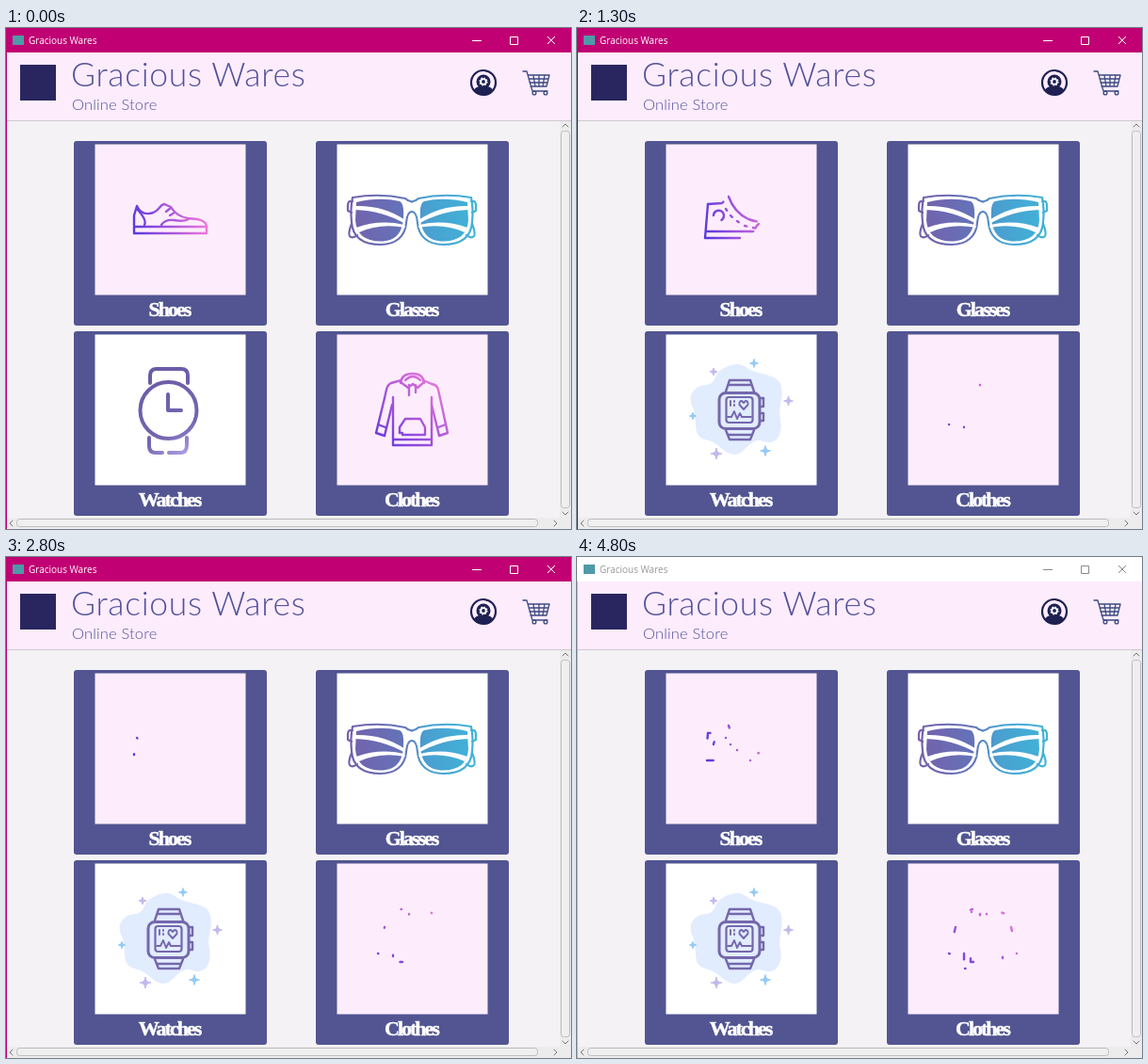
An HTML page for the animation above (4900 ms loop, 600x532 px).

```html
<!DOCTYPE html>
<html lang="en">
<head>
<meta charset="utf-8">
<title>Gracious Wares</title>
<style>
html, body { margin: 0; width: 100%; height: 100%; overflow: hidden; }
svg { display: block; width: 100%; height: 100%; }
.line { fill: none; stroke-linecap: round; stroke-linejoin: round; }
.label { font: bold 22px "Liberation Serif", serif; letter-spacing: -2px; fill: #fff; stroke: #fff; stroke-width: .5; text-anchor: middle; }
.name { font: 300 35.5px Lato, sans-serif; letter-spacing: .7px; }
.sub { font: 300 16.5px Lato, sans-serif; letter-spacing: .15px; }
.caption { font: 10px "Open Sans", sans-serif; }
.bar, .edge { fill: #c00073; }
.caption { fill: #fff; }
.buttons { stroke: #fff; }
.idle .bar { fill: #fff; }
.idle .edge { fill: #c6c4c8; }
.idle .caption { fill: #999; }
.idle .buttons { stroke: #8a8a8a; }
</style>
</head>
<body>
<svg id="stage" viewBox="0 0 600 532">
  <defs>
    <linearGradient id="shoeInk" gradientUnits="userSpaceOnUse" x1="136" y1="212" x2="212" y2="196">
      <stop offset="0" stop-color="#5a3bdc"/><stop offset=".5" stop-color="#a856dc"/><stop offset="1" stop-color="#f27ad8"/>
    </linearGradient>
    <linearGradient id="hoodInk" gradientUnits="userSpaceOnUse" x1="398" y1="438" x2="458" y2="374">
      <stop offset="0" stop-color="#6a3be0"/><stop offset=".5" stop-color="#ab56da"/><stop offset="1" stop-color="#e878d8"/>
    </linearGradient>
    <linearGradient id="lensInk" gradientUnits="userSpaceOnUse" x1="363" y1="0" x2="500" y2="0">
      <stop offset="0" stop-color="#7460ac"/><stop offset=".42" stop-color="#6473b8"/><stop offset=".6" stop-color="#4a9fd0"/><stop offset="1" stop-color="#40b4d8"/>
    </linearGradient>
    <linearGradient id="watchInk" gradientUnits="userSpaceOnUse" x1="150" y1="370" x2="196" y2="452">
      <stop offset="0" stop-color="#6a5ba6"/><stop offset=".7" stop-color="#7566b0"/><stop offset="1" stop-color="#b4a2e8"/>
    </linearGradient>
    <linearGradient id="glass" x1="0" y1="0" x2="1" y2="1">
      <stop offset="0" stop-color="#dceaf8"/><stop offset=".35" stop-color="#fff"/><stop offset="1" stop-color="#e4eefa"/>
    </linearGradient>
    <g id="half">
      <g class="line" stroke="#fff" stroke-width="2.2">
        <path d="M431 184.500Q427 184 424 181Q397 175 368 180C366 190 366 197 367 206C368 222 379 230 398 230C414 230 424 221 425 207Q426 195 431 195"/>
        <path d="M368 184H365Q363 185 363 189V194L367 196M367 208Q363 218 365 221Q368 224 373 220"/>
      </g>
      <path fill="#fff" d="M372 185Q397 179 418 184Q423 186 422 202C421 218 413 226.500 398 226.500C381 226.500 372 219 371 204Z"/>
      <path d="M370 189Q401 188 424 204V208Q400 194 370 193ZM372 212Q397 203 423 209L424 212Q397 207 375 217Z"/>
    </g>
    <mask id="frameMask" maskUnits="userSpaceOnUse" x="355" y="170" width="153" height="66">
      <use href="#half"/><use href="#half" transform="matrix(-1 0 0 1 862 0)"/>
    </mask>
    <g id="pinkHalf">
      <path d="M366 185Q395 180 421 184Q427 188 432 188V197Q426 197 423 207Q420 227 404 228Q382 230 374 220Q368 211 368 200L362 197V187Z" fill="#df8abc" stroke="#553459" stroke-width="1.4"/>
      <path d="M369 199Q371 226 404 227Q418 226 421 212Q412 224 392 221Q376 217 374 198Z" fill="#754078"/>
      <path d="M376 192Q398 187 417 191Q421 194 419 204Q415 221 402 221Q379 220 376 207Q373 197 376 192Z" fill="url(#glass)" stroke="#553459" stroke-width="1.3"/>
      <circle cx="367" cy="193" r="2.6" fill="#d98a4a" stroke="#553459"/>
    </g>
  </defs>

  <rect width="600" height="532" fill="#f4f2f5"/>
  <rect class="bar" width="600" height="26"/>
  <rect x="7" y="8" width="12" height="10" fill="#4f9aa8"/>
  <text class="caption" x="24" y="17">Gracious Wares</text>
  <path class="buttons" fill="none" d="M495 13.5H505M535.5 9.5H543.5V17.5H535.5ZM575 9L583 17M583 9L575 17"/>

  <rect y="26" width="600" height="72" fill="#fdecfc"/>
  <rect y="98" width="600" height="1" fill="#cfc8d0"/>
  <rect x="15" y="39" width="38" height="38" fill="#29265f"/>
  <g fill="#525299">
    <text class="name" x="69" y="62">Gracious Wares</text>
    <text class="sub" x="70" y="87">Online Store</text>
  </g>
  <circle cx="507" cy="58" r="13" fill="none" stroke="#1f2153" stroke-width="2.2"/>
  <path d="M497 66Q499 62 504 62H510Q515 62 517 66Q513 71 507 71Q501 71 497 66Z" fill="#1f2153"/>
  <circle cx="507" cy="57" r="7.5" fill="#1f2153"/>
  <circle cx="507" cy="57" r="2.8" fill="none" stroke="#fff" stroke-width="1.8"/>
  <circle cx="507" cy="57" r="4" fill="none" stroke="#fff" stroke-width="1.2" stroke-dasharray="1.6 1.54"/>
  <g class="line" stroke="#3c4a80" stroke-width="1.3">
    <path d="M549 46H553L559 67H575M554 50H577L574 62H557M555 54H576M556 58H575M560 50L562 62M566 50V62M572 50L570 62"/>
    <circle cx="561" cy="69" r="1.9"/><circle cx="573" cy="69" r="1.9"/>
  </g>

  <g id="cards"></g>

  <g id="blueGlasses"><rect x="355" y="170" width="153" height="66" fill="url(#lensInk)" mask="url(#frameMask)"/></g>
  <g id="pinkGlasses">
    <path fill="#fadde8" d="M385 138C400 130 420 138 435 132C455 127 462 143 485 142C510 144 508 172 490 176C478 182 500 183 508 200C514 220 500 237 470 236C478 243 485 250 480 257C470 272 430 262 410 270C395 274 384 265 388 255C393 245 385 242 370 240C352 235 350 210 365 203C385 195 395 185 380 177C362 170 364 143 385 138Z"/>
    <use href="#pinkHalf"/><use href="#pinkHalf" transform="matrix(-1 0 0 1 863 0)"/>
    <path class="line" stroke="#5b6077" stroke-width="1.2" d="M384 210L399 196M390 212L407 202M464 210L481 194M472 212L485 200"/>
  </g>

  <g id="roundWatch" class="line" stroke="url(#watchInk)" stroke-width="4">
    <circle cx="172.5" cy="406" r="30"/>
    <path d="M172 389V406H186M153 377V369Q153 362 160 362H186Q193 362 193 369V377M152 435V444Q152 451 159 451H166M173 451H185Q192 451 192 443V435"/>
  </g>
  <g id="smartWatch">
    <path id="wideBlob" fill="#e2ecff" d="M152 364C162 356 174 354 182 362C194 369 215 367 217 381C220 394 213 402 216 416C219 432 211 444 198 439C184 434 179 452 168 453C154 452 152 440 136 437C121 433 129 416 123 403C116 389 126 379 138 379C148 377 145 369 152 364Z"/>
    <path id="slimBlob" fill="#e2ecff" d="M154 363C165 354 176 355 184 364C194 371 211 369 215 382C219 394 216 406 218 418C217 431 210 438 198 437C185 438 180 451 169 452C154 452 151 440 138 436C127 431 134 416 129 405C123 391 128 381 140 379C149 376 147 368 154 363Z"/>
    <g id="stars"></g>
    <g class="line" stroke="#7468ac" stroke-width="3">
      <rect x="151" y="387.5" width="43" height="38" rx="7"/>
      <rect x="158.5" y="392" width="28" height="27" rx="3" stroke-width="2.2"/>
      <path stroke-width="2.4" d="M158 386L162 374H184L188 386M161 379H185M158 427L162 437H184L188 427M161 432H185M195 393H198V402H195M195 409H198V417H195"/>
      <path stroke-width="1.9" d="M160 413H164L167 407L170 415L173 409L175 413H185M163 396V401M167 396V397M167 400V401M177 405L172.500 400Q172 396 175 396L177 398L179 396Q182 396 181.500 400Z"/>
    </g>
  </g>
  <g id="lowShoe" class="line" stroke="url(#shoeInk)" stroke-width="2.4"></g>
  <g id="highShoe" class="line" stroke="url(#shoeInk)" stroke-width="2.4"></g>
  <g id="hoodie" class="line" stroke="url(#hoodInk)" stroke-width="2.4"></g>

  <g fill="#ececec">
    <rect x="588" y="99" width="12" height="433"/><rect y="520" width="600" height="12"/>
  </g>
  <g fill="#f0eff0" stroke="#bdbdbd">
    <rect x="589.5" y="109.5" width="9" height="400" rx="3"/><rect x="11.5" y="521.5" width="553" height="8" rx="3"/>
  </g>
  <path class="line" stroke="#777" d="M591 105L594 102L597 105M591 514L594 517L597 514M7 523L4 526L7 529M582 523L585 526L582 529"/>
  <rect class="edge" y="26" width="1" height="506"/>
</svg>
<script>
const LOOP = 4900;
const $ = id => document.getElementById(id);
const clamp = x => Math.min(1, Math.max(0, x));
const mod = (a, n) => ((a % n) + n) % n;

function add(parent, tag, attrs, text = "") {
  const el = document.createElementNS("http://www.w3.org/2000/svg", tag);
  for (const k in attrs) el.setAttribute(k, attrs[k]);
  el.textContent = text;
  parent.appendChild(el);
  return el;
}

function card(x, y, label, fill) {
  add($("cards"), "rect", { x, y, width: 205, height: 196, rx: 3, fill: "#525592" });
  add($("cards"), "rect", { x: x + 22.5, y: y + 3.5, width: 160, height: 160, fill });
  add($("cards"), "text", { x: x + 101.5, y: y + 186, class: "label" }, label);
}
const pink = "#fdedfc";
card(72, 120, "Shoes", pink);
card(329, 120, "Glasses", "#fff");
card(72, 322, "Watches", "#fff");
card(329, 322, "Clothes", pink);

function star(x, y, r, fill) {
  const d = `M${x} ${y - r}Q${x} ${y} ${x + r} ${y}Q${x} ${y} ${x} ${y + r}Q${x} ${y} ${x - r} ${y}Q${x} ${y} ${x} ${y - r}Z`;
  add($("stars"), "path", { d, fill, stroke: fill, "stroke-width": 1.6, "stroke-linejoin": "round" });
}
const lilac = "#c3b8ee", sky = "#94cbf6";
star(145, 365, 3.5, lilac); star(188, 356, 4, sky); star(224.5, 396, 4.5, lilac);
star(123, 412, 3.2, sky); star(148, 452, 5.5, lilac); star(200, 449, 5, sky);

// Strokes are listed in the order they begin to draw.
const strokes = (id, list) =>
  list.split("|").map(d => add($(id), "path", { d, pathLength: 1 }));

const low = strokes("lowShoe",
  "M139 192Q150 204 147 209|M136 210V199L139 189Q143 198 152 197C163 196 162 188 168 187|" +
  "M213 211H136|M136 212V218H213V211|M168 187L175 190Q181 200 193 202L203 203Q213 205 213 211|" +
  "M165 209Q169 203 178 204Q188 206 194 203|M170 195L175 191|M174 199L179 196");

const high = strokes("highShoe",
  "M139 187L154 186L161 179|M138 216H211|M145 199A5.500 5.500 0 1 1 145 199.500|" +
  "M193 208Q188 212 190 215|M184 216H185|" +
  "M139 187L136 223H200Q210 222 212 214|M161 179Q167 196 182 203Q194 207 204 207Q212 209 212 215|" +
  "M158 192L160 195|M163 199L166 202|M170 205L173 207|M178 210L182 211|M187 212L191 213");

const hood = strokes("hoodie",
  "M428 379V390|M395 421L403 424|M411 424V392|M421 430H418V424L424 415H440L445 424V432H421|M452 378L443 374|" +
  "M420 374L409 377Q405 379 404 384L402 393|M402 393L393 430L402 433L410 400|" +
  "M452 378Q458 379 459 384L461 393|M461 393L469 430L460 433L452 400|" +
  "M411 424V443H452V426|M452 426V392|M435 379V387|M467 421L459 424|M412 437H451|" +
  "M419 377Q420 367 432 367Q443 367 444 377|M419 376L427 382L432 378L437 382L444 376|M424 374Q432 366 440 374");

function reveal(paths, p) {
  const lag = 0.12;
  paths.forEach((el, i) => {
    const q = clamp(p * (1 + lag) - lag * i / (paths.length - 1));
    el.style.display = q > 0 ? "" : "none";
    el.setAttribute("stroke-dasharray", q < 1 ? `${q.toFixed(4)} 2` : "none");
  });
}

// Full, then wiped away, a pause, then drawn again.
const cycle = (v, out0, out1, in0, in1) =>
  v < in0 ? 1 - clamp((v - out0) / (out1 - out0)) : clamp((v - in0) / (in1 - in0));

const show = (id, on) => { $(id).style.display = on ? "" : "none"; };

function draw(t) {
  $("stage").classList.toggle("idle", t >= 3900);

  const blue = t % 400 < 200;
  show("blueGlasses", blue);
  show("pinkGlasses", !blue);

  const round = t % 500 < 200;
  show("roundWatch", round);
  show("smartWatch", !round);
  show("wideBlob", blue);
  show("slimBlob", !blue);

  const p = cycle(t % 1950, 50, 650, 830, 1600);
  const isHigh = mod(Math.floor((t - 750) / 1950), 2) === 0;
  reveal(low, isHigh ? 0 : p);
  reveal(high, isHigh ? p : 0);
  reveal(hood, cycle(t % 2030, 200, 800, 1290, 1850));
}

const start = performance.now();
function tick() {
  draw((performance.now() - start) % LOOP);
  requestAnimationFrame(tick);
}
tick();
</script>
</body>
</html>
```
